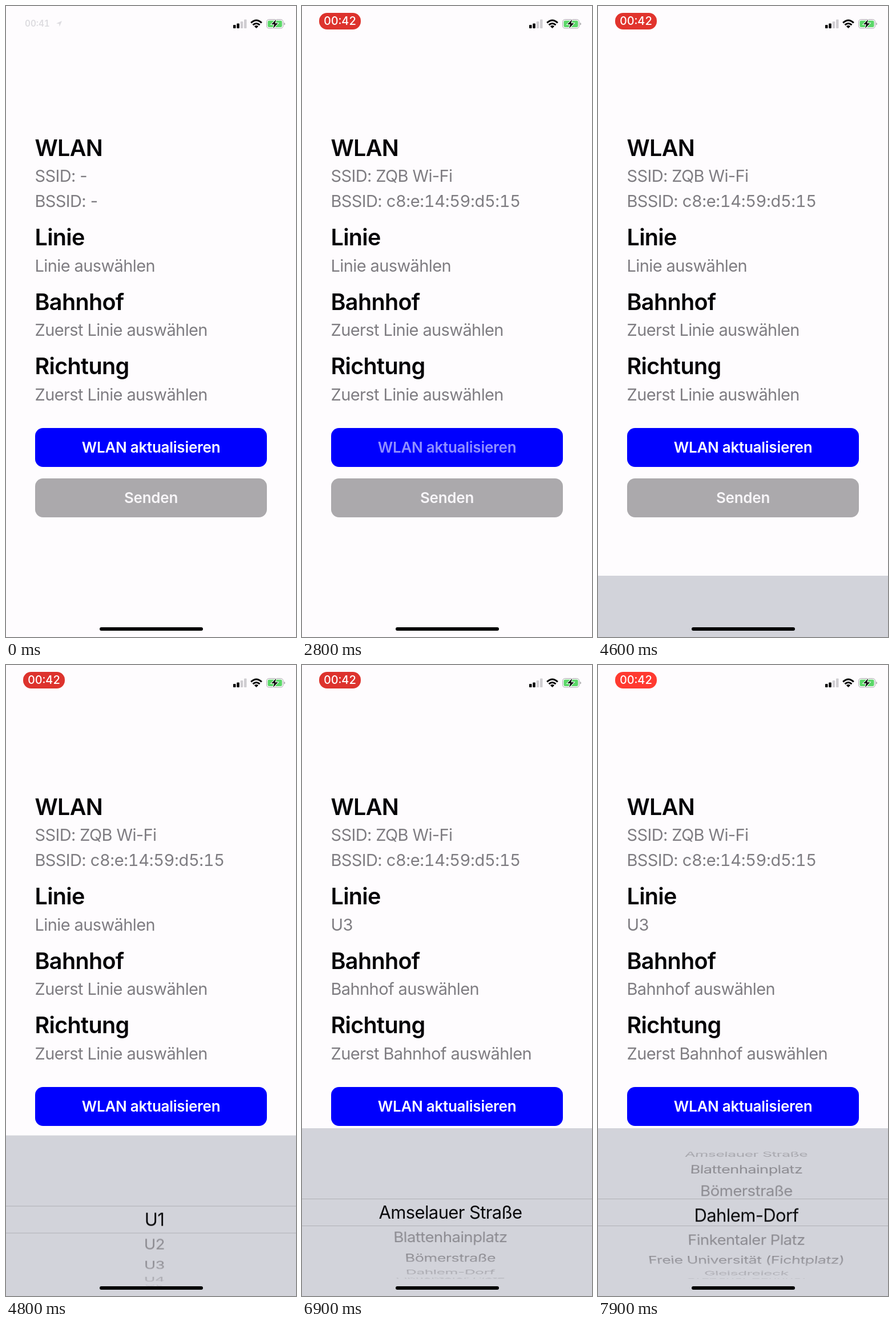
An HTML page that plays this animation: 508x1102 px, repeating every 8000 ms.

```html
<!DOCTYPE html>
<html lang="de">
<head>
<meta charset="utf-8">
<title>WLAN-Erfassung</title>
<style>
:root { --loop: 8s; --r: 126px; }
html, body { margin: 0; width: 100%; height: 100%; overflow: hidden; }
body {
  position: relative;
  background: #fefcfe;
  font-family: Inter, Roboto, "Liberation Sans", sans-serif;
  font-optical-sizing: none;
}
.stage { position: absolute; left: 0; top: 0; width: 508px; height: 1102px; overflow: hidden; }
.stage * { animation-duration: var(--loop); animation-iteration-count: infinite; }

/* Text is centred on --y by its capital height */
h2, p {
  position: absolute; left: 50.5px; top: var(--y);
  margin: 0; line-height: 0; white-space: nowrap;
}
h2 { font-size: 39.5px; font-weight: 600; letter-spacing: -.017em; color: #040306; }
p { font-size: 29px; letter-spacing: -.021em; color: #7f7d82; }
.mac { font-variant-numeric: tabular-nums; letter-spacing: -.012em; }

.button {
  position: absolute; left: 51px; top: var(--y); width: 406px; height: 67.7px;
  border-radius: 14px; line-height: 68px; text-align: center;
  font-size: 26px; font-weight: 600; letter-spacing: -.01em; color: #fff;
}
.refresh { background: #0000fe; }
.refresh span { animation-name: press; }
.send { background: #aba9ac; color: #f8f6f9; }

.clock, .pill { font-variant-numeric: tabular-nums; }
.clock {
  position: absolute; left: 33px; top: 31px; line-height: 0;
  font-size: 15.3px; font-weight: 600; color: #dddce0; animation-name: clock-out;
}
.clock svg { position: absolute; left: 54px; top: -6px; }
.pill {
  position: absolute; left: 30px; top: 12px; width: 73px; height: 29px;
  border-radius: 14px; line-height: 29px; text-align: center;
  font-size: 20px; font-weight: 500; color: #fff; background: #ff3a30;
  animation-name: pill-in, pulse; animation-timing-function: linear, ease-in-out;
}
.icons { position: absolute; left: 0; top: 0; }
.home {
  position: absolute; left: 164px; top: 1085px; width: 181px; height: 6px;
  border-radius: 3px; background: #000;
}

.panel {
  position: absolute; left: 0; top: 809px; width: 508px; height: 293px;
  background: #d2d3da; animation-name: rise;
}
.panel::after {
  content: ""; position: absolute; left: 0; top: 123px; width: 100%; height: 46px;
  border: solid #b1b1b7; border-width: 1px 0;
}
.wheel, .layer { position: absolute; inset: 0; }
.layer { perspective: 1300px; }
.rim {
  font-size: 27.7px; color: #8b8a90;
  mask-image: linear-gradient(transparent 21px, #0007 38px, #000 71px 123px,
    transparent 123px 170px, #000 170px 222px, #0007 255px, transparent 272px);
}
.band { font-size: 31px; color: #09090b; clip-path: inset(123px 0); }
.drum {
  position: absolute; left: 5.5px; top: 126.5px; width: 508px; height: 40px;
  transform-style: preserve-3d;
}
.row {
  position: absolute; inset: 0; line-height: 40px; text-align: center;
  letter-spacing: -.02em; white-space: nowrap; backface-visibility: hidden;
  transform: rotateX(calc(var(--i) * -20deg)) translateZ(var(--r));
}
#lines .drum { animation-name: spin-lines; }
#stations .drum { animation-name: spin-stations; }

.wifi-off, .wifi-on, .line-off, .line-on, #lines, #stations { animation-timing-function: step-end; }
.wifi-off { animation-name: wifi-off; }
.wifi-on { animation-name: wifi-on; }
.line-off { animation-name: line-off; }
.line-on { animation-name: line-on; }
#lines { animation-name: wheel-off; }
#stations { animation-name: wheel-on; }

@keyframes wifi-off { 0% { opacity: 1 } 33.75% { opacity: 0 } }
@keyframes wifi-on { 0% { opacity: 0 } 33.75% { opacity: 1 } }
@keyframes line-off { 0% { opacity: 1 } 72.5% { opacity: 0 } }
@keyframes line-on { 0% { opacity: 0 } 72.5% { opacity: 1 } }
@keyframes wheel-off { 0% { opacity: 1 } 81.25% { opacity: 0 } }
@keyframes wheel-on { 0% { opacity: 0 } 81.25% { opacity: 1 } }

@keyframes clock-out { 0% { opacity: 1 } 1.9%, 100% { opacity: 0 } }
@keyframes pill-in { 0%, 1.5% { opacity: 0 } 5%, 100% { opacity: 1 } }
@keyframes pulse {
  0%, 22.2%, 47.8%, 73.4%, 99%, 100% { background: #ff3a30 }
  9.4%, 35%, 60.6%, 86.25% { background: #dd332d }
}
@keyframes press {
  0%, 31.2% { color: #fff }
  31.25%, 35.25% { color: #8f8fff }
  39.5%, 100% { color: #fff }
}
@keyframes rise {
  0%, 57% { transform: translateY(293px); animation-timing-function: cubic-bezier(.2, .8, .2, 1) }
  62.6%, 100% { transform: translateY(0) }
}
@keyframes spin-lines {
  0%, 63.5% { transform: translateZ(calc(var(--r) * -1)) rotateX(0deg); animation-timing-function: cubic-bezier(.4, 0, .7, .9) }
  68.75% { transform: translateZ(calc(var(--r) * -1)) rotateX(36deg); animation-timing-function: ease-out }
  73%, 100% { transform: translateZ(calc(var(--r) * -1)) rotateX(40deg) }
}
@keyframes spin-stations {
  0%, 88.5% { transform: translateZ(calc(var(--r) * -1)) rotateX(0deg); animation-timing-function: cubic-bezier(.4, 0, .5, .95) }
  98.75% { transform: translateZ(calc(var(--r) * -1)) rotateX(57.6deg); animation-timing-function: linear }
  100% { transform: translateZ(calc(var(--r) * -1)) rotateX(58.4deg) }
}
</style>
</head>
<body>
<div class="stage">
  <div class="clock">00:41
    <svg width="12" height="12"><path d="M11 1 1 5.4l5 .7.7 5z" fill="#dddce0"/></svg>
  </div>
  <div class="pill">00:42</div>

  <svg class="icons" width="508" height="60">
    <g fill="#000">
      <rect x="398" y="33" width="4.5" height="6" rx="1"/>
      <rect x="404.3" y="30.5" width="4.5" height="8.5" rx="1"/>
    </g>
    <g fill="#cfcdd1">
      <rect x="410.7" y="27" width="4.5" height="12" rx="1"/>
      <rect x="417" y="23.5" width="4.5" height="15.5" rx="1"/>
    </g>
    <g fill="none" stroke="#000" stroke-width="3">
      <path d="M429.2 29.4q9.3-8.8 18.6 0"/>
      <path d="M432.5 33.2q6-5.4 12 0"/>
    </g>
    <path d="M434.9 35.4q3.6-2.9 7.2 0l-3.6 3.7z"/>
    <rect x="456.5" y="23.5" width="29" height="15.5" rx="4.2" fill="none" stroke="#a9a7ab"/>
    <path d="M487 28.7q2 .8 2 2.5t-2 2.5z" fill="#a9a7ab"/>
    <rect x="458.4" y="25.4" width="25.2" height="11.7" rx="2.4" fill="#5bd768"/>
    <path d="M473.3 23.4l-8.3 8.7h5l-2.1 7 8.4-8.9h-5.1z" stroke="#fefcfe" stroke-width="2" paint-order="stroke"/>
  </svg>

  <h2 style="--y:247.5px">WLAN</h2>
  <p class="wifi-off" style="--y:297px">SSID: -</p>
  <p class="wifi-on" style="--y:297px">SSID: ZQB Wi-Fi</p>
  <p class="wifi-off" style="--y:340.5px">BSSID: -</p>
  <p class="wifi-on" style="--y:340.5px">BSSID: <span class="mac">c8:e:14:59:d5:15</span></p>

  <h2 style="--y:404px">Linie</h2>
  <p class="line-off" style="--y:453.5px">Linie auswählen</p>
  <p class="line-on" style="--y:453.5px">U3</p>

  <h2 style="--y:516.5px">Bahnhof</h2>
  <p class="line-off" style="--y:566px">Zuerst Linie auswählen</p>
  <p class="line-on" style="--y:566px">Bahnhof auswählen</p>

  <h2 style="--y:629px">Richtung</h2>
  <p class="line-off" style="--y:678.5px">Zuerst Linie auswählen</p>
  <p class="line-on" style="--y:678.5px">Zuerst Bahnhof auswählen</p>

  <div class="button refresh" style="--y:737px"><span>WLAN aktualisieren</span></div>
  <div class="button send" style="--y:825px">Senden</div>

  <div class="panel">
    <div class="wheel" id="lines"></div>
    <div class="wheel" id="stations"></div>
  </div>
  <div class="home"></div>
</div>

<script>
// Each wheel holds a grey rim and a larger dark copy seen through the band.
function buildWheel(id, names) {
  const rows = names.map((name, i) => `<div class="row" style="--i:${i}">${name}</div>`).join("");
  document.getElementById(id).innerHTML = ["rim", "band"]
    .map(kind => `<div class="layer ${kind}"><div class="drum">${rows}</div></div>`).join("");
}

buildWheel("lines", ["U1", "U2", "U3", "U4", "U5", "U55", "U6", "U7"]);
buildWheel("stations", [
  "Amselauer Straße", "Blattenhainplatz", "Bömerstraße", "Dahlem-Dorf",
  "Finkentaler Platz", "Freie Universität (Fichtplatz)", "Gleisdreieck", "Gräbener Bahnhof"
]);
</script>
</body>
</html>
```
